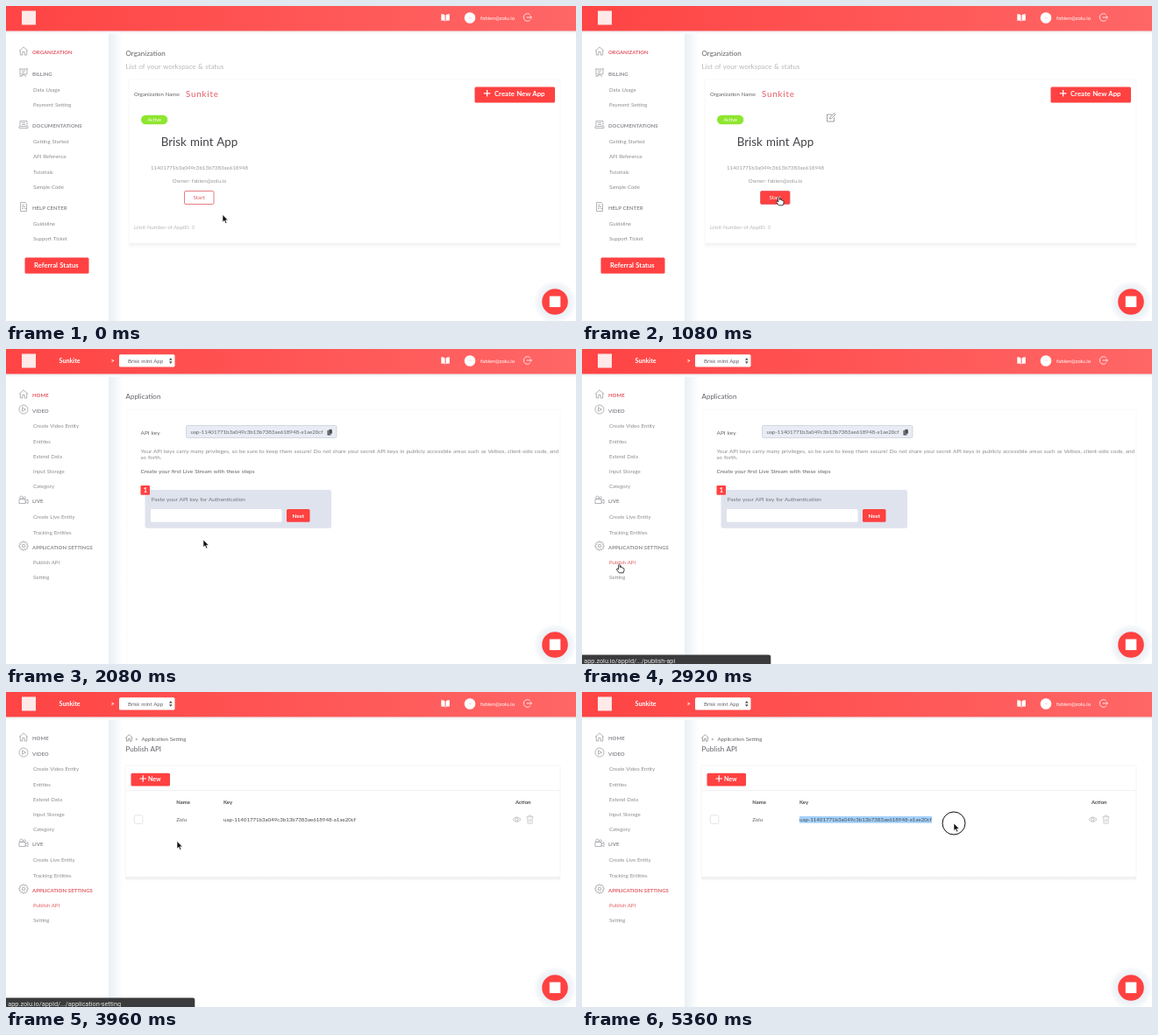
Recreate the animation shown at these times as an HTML page. Size 650 px wide and 360 px high, loop 5400 ms.

```html
<!DOCTYPE html>
<html lang="en">
<head>
<meta charset="utf-8">
<title>Console walkthrough</title>
<style>
html, body { margin: 0; width: 100%; height: 100%; overflow: hidden; background: #fff; }
svg { display: block; width: 650px; height: 360px; }
text { font-family: Lato, sans-serif; word-spacing: .06em; white-space: pre; }
.url { font-family: Roboto, sans-serif; word-spacing: 0; }
</style>
</head>
<body>
<svg id="stage" viewBox="0 0 650 360"></svg>
<script>
const RED = '#ff4141', ROSE = '#e25c64', GREY = '#8c8c92', DARK = '#626268', PALE = '#b8b8bc';
const ORG = 'Sunkite', APP = 'Brisk mint App', BRAND = 'Zolu', MAIL = 'fabien@zolu.io';
const ID = '11401771b3a049c3b13b7383ae618948', KEY = `uap-${ID}-a1ae20cf`;
const LOOP = 5400, OPEN_APP = 1120, OPEN_API = 3080;

const text = (x, y, s, size, fill = GREY, more = '') =>
  `<text x="${x}" y="${y}" font-size="${size}" fill="${fill}" ${more}>${s}</text>`;
const bold = (x, y, s, size, fill, more = '') => text(x, y, s, size, fill, 'font-weight="700" ' + more);
const mid = (x, y, s, size, fill) => text(x, y, s, size, fill, 'text-anchor="middle"');
const rect = (x, y, w, h, fill, r = 0, more = '') =>
  `<rect x="${x}" y="${y}" width="${w}" height="${h}" rx="${r}" fill="${fill}" ${more}/>`;
const line = (d, color, w = .7, more = '') =>
  `<path d="${d}" fill="none" stroke="${color}" stroke-width="${w}" stroke-linejoin="round" ${more}/>`;
const group = (id, ...parts) => `<g id="${id}">${parts.join('')}</g>`;
const plus = (x, y) => line(`M${x - 3.8} ${y}h7.6M${x} ${y - 3.8}v7.6`, '#fff', 1.2);

// Icons are drawn around their own centre
const ICONS = {
  home: 'M-5 0L0-4.7L5 0M-3.7-1V4.5H-1.2V1H1.2V4.5H3.7V-1',
  bill: 'M-5-4.5H5M-4-4.5V1.5H4V-4.5M-2-2.5H2M-2-.5H1M-3 4.5L0 1.5L3 4.5M-5 3.5H-2',
  docs: 'M-4-4H4V2H-4ZM-5 2V4H5V2M-2-2H2M-2 0H2',
  help: 'M-3.5-5H2L3.5-3V5H-3.5ZM-2-2H1M-2 0H2M-2 2H0M1 2H3',
  video: 'M5 0A5 5 0 1 1-5 0A5 5 0 1 1 5 0M-1.5-2.3L2.5 0L-1.5 2.3Z',
  live: 'M-5-1H2V4H-5ZM2 1L5-.5V4L2 2.5M-2.5-1A1.7 1.7 0 1 1-2.4-1M1-1A1.3 1.3 0 1 1 1.1-1',
  gear: 'M1.8 0A1.8 1.8 0 1 1-1.8 0A1.8 1.8 0 1 1 1.8 0M-1-5H1L1.4-3.6L3-4.3L4.3-3L3.6-1.4L5-1V1L3.6 1.4L4.3 3L3 4.3L1.4 3.6L1 5H-1L-1.4 3.6L-3 4.3L-4.3 3L-3.6 1.4L-5 1V-1L-3.6-1.4L-4.3-3L-3 -4.3L-1.4-3.6Z',
  eye: 'M-4.5 0Q0-5.4 4.5 0Q0 5.4-4.5 0M1.5 0A1.5 1.5 0 1 1-1.5 0A1.5 1.5 0 1 1 1.5 0',
  bin: 'M-4-3H4M-1.5-3V-4.5H1.5V-3M-3-3L-2.6 4.5H2.6L3-3M-1-1V3M1-1V3',
  edit: 'M1-3.5H-4.5V4.5H3.5V0M-1.5 1.5L-1-.5L3.5-5L5-3.5L.5 1Z',
  exit: 'M3.2-3A4.3 4.3 0 1 0 3.2 3M-1 0H5M3.2-1.8L5 0L3.2 1.8'
};
const icon = (name, x, y, color = '#94949b', w = .7, k = 1) =>
  line(ICONS[name], color, w, `transform="translate(${x} ${y}) scale(${k})"`);

// Menu sections: icon, title, y, then item and y pairs
const menu = (sections, active) => sections.map(([ic, title, y, ...items]) => {
  let out = icon(ic, 20, y - 1.5) +
    bold(30, y + 2.2, title, 6, title === active ? ROSE : GREY, `data-item="${title}"`);
  for (let i = 0; i < items.length; i += 2)
    out += text(31, items[i + 1] + 2, items[i], 6, GREY, `data-item="${items[i]}"`);
  return out;
}).join('');

const orgMenu = [
  ['home', 'ORGANIZATION', 53],
  ['bill', 'BILLING', 78, 'Data Usage', 96, 'Payment Setting', 113],
  ['docs', 'DOCUMENTATIONS', 137, 'Getting Started', 155, 'API Reference', 172, 'Tutorials', 190, 'Sample Code', 207],
  ['help', 'HELP CENTER', 231, 'Guideline', 248.5, 'Support Ticket', 266]
];
const appMenu = [
  ['home', 'HOME', 53],
  ['video', 'VIDEO', 70.5, 'Create Video Entity', 88, 'Entities', 105.5, 'Extend Data', 122.5, 'Input Storage', 140, 'Category', 157],
  ['live', 'LIVE', 174, 'Create Live Entity', 192, 'Tracking Entities', 209.5],
  ['gear', 'APPLICATION SETTINGS', 226.5, 'Publish API', 244, 'Setting', 261]
];

const stage = document.getElementById('stage');
stage.innerHTML = `
<defs>
  <linearGradient id="bar"><stop stop-color="#ff4444"/><stop offset="1" stop-color="#ff6666"/></linearGradient>
  <linearGradient id="side"><stop stop-color="#e9eff4"/><stop offset="1" stop-color="#fff"/></linearGradient>
  <linearGradient id="drop" x2="0" y2="1"><stop stop-color="#e9e9ec"/><stop offset="1" stop-color="#fff"/></linearGradient>
  <radialGradient id="halo"><stop offset=".55" stop-color="#e6ecf2"/><stop offset="1" stop-color="#fbfcfd"/></radialGradient>
</defs>` +
rect(0, 0, 650, 360, '#fff') +
rect(117, 28, 16, 332, 'url(#side)') +
rect(0, 28, 650, 4, 'url(#drop)') +
rect(0, 0, 650, 28.5, 'url(#bar)') +
rect(18, 5.5, 16, 16, '#ffe9e9') +
'<path d="M500.6 10.5Q499 9 496.3 9.3V16.7Q499 16.2 500.6 17.5ZM501.6 10.5Q503 9 505.8 9.3V16.7Q503 16.2 501.6 17.5Z" fill="#fff"/>' +
`<circle cx="529" cy="13.5" r="6.3" fill="#fff"/>` + line('M526.5 13.5H531.5', '#f6dede', .8) +
text(541, 15.6, MAIL, 6.1, '#fff') +
icon('exit', 594.5, 13, '#fff', .8) +

group('orgPage',
  menu(orgMenu, 'ORGANIZATION'),
  rect(21.5, 287.5, 73, 18.3, RED, 1.5), bold(32, 299.4, 'Referral Status', 7.7, '#fff'),
  text(136.5, 56.8, 'Organization', 8, DARK),
  text(136.5, 71.6, 'List of your workspace &amp; status', 8, PALE),
  rect(140, 84, 492, 188, '#fff', 2, 'stroke="#f6f7f9" stroke-width=".8"'),
  rect(140, 271, 492, 6, 'url(#drop)', 0, 'opacity=".6"'),
  text(146, 103, 'Organization Name:', 6, DARK),
  text(205, 103.6, ORG, 9.8, ROSE, 'letter-spacing=".8"'),
  rect(534.5, 92.4, 91.5, 18.2, RED, 1.5), plus(548.6, 99.8), bold(557, 103.4, 'Create New App', 7.75, '#fff'),
  rect(154, 124.8, 30.3, 10.4, '#8ee62e', 5.2), mid(169.2, 132, 'Active', 5.6, '#fff'),
  group('edit', icon('edit', 284, 127.5, '#8a8a90', .8)),
  mid(220.5, 159.5, APP, 13.4, '#44444a'),
  mid(220.5, 187.2, ID, 6.12, '#98989c'),
  mid(220.5, 202.2, 'Owner: ' + MAIL, 6.15, '#98989c'),
  rect(203.5, 211.5, 33.5, 15, '#fff', 1.5, `id="start" stroke="${ROSE}" stroke-width=".8"`),
  group('startText', mid(220.2, 221.2, 'Start', 6.3)),
  text(146, 255, 'Limit Number of AppID: 3', 6, PALE)
) +

group('appPages',
  menu(appMenu),
  bold(60.5, 16.2, ORG, 7.2, '#fff'), bold(119.5, 16.2, '&gt;', 7.5, '#fff'),
  rect(129, 6.3, 63.5, 14.3, '#fff', 1.5), text(139, 15.7, APP, 6.15, DARK),
  '<path d="M186 12.7L187.8 10L189.6 12.7ZM186 14.3L187.8 17L189.6 14.3Z" fill="#555"/>'
) +

group('keyPage',
  text(136.5, 56.8, 'Application', 8, DARK),
  rect(138, 69, 494, 300, 'none', 2, 'stroke="#f8f8fa" stroke-width=".8"'),
  text(153.5, 97.8, 'API key', 6.5, DARK),
  rect(205.5, 87.5, 171.5, 14, '#e9ecf4', 1.5, 'stroke="#ccd0dc" stroke-width=".8"'),
  text(210.5, 97, KEY, 6.13, DARK),
  rect(366.5, 93, 4, 5.5, '#444', .6), rect(368, 91.8, 4, 5.2, '#444', .6, 'stroke="#e9ecf4" stroke-width=".5"'),
  text(153.5, 118.8, 'Your API keys carry many privileges, so be sure to keep them secure! Do not share your secret API keys in publicly accessible areas such as Velbox, client-side code, and', 6.4),
  text(153.5, 125.8, 'so forth.', 6.4),
  text(153.5, 142, 'Create your first Live Stream with these steps', 6.42, DARK),
  rect(158.5, 161, 212.5, 43.8, '#dfe3ed', 2),
  rect(153.5, 156, 10.5, 10.7, RED, 1), bold(156.7, 164, '1', 7.2, '#fff'),
  text(165.8, 173.8, 'Paste your API key for Authentication', 6.43, '#74747c'),
  rect(165, 183, 149.5, 14.8, '#fff', 1),
  rect(320, 183, 26.5, 14.8, RED, 1.5), bold(326.5, 192.6, 'Next', 6.3, '#fff')
) +

group('apiPage',
  icon('home', 140.3, 52.5, '#77777c', .8, .8),
  text(147, 56, '&gt;', 6.1, DARK), text(154.5, 56, 'Application Setting', 6.1, DARK),
  text(136.5, 68.2, 'Publish API', 8.1, DARK),
  rect(136, 211, 496, 5, 'url(#drop)'),
  rect(136, 84, 496, 127.5, '#fff', 1.5, 'stroke="#f0f1f3" stroke-width=".8"'),
  line('M136 112.5H632', '#eeeff1', .8),
  rect(142.5, 92.7, 44.5, 14.8, RED, 1.5), plus(156.2, 99), bold(162, 102.2, 'New', 7, '#fff'),
  bold(194.3, 128.4, 'Name', 5.9, '#4a4a50'), bold(248, 128.4, 'Key', 5.9, '#4a4a50'), bold(581, 128.4, 'Action', 5.9, '#4a4a50'),
  rect(146.3, 140.8, 9.6, 9.8, '#fff', 2, 'stroke="#dddde0" stroke-width=".8"'),
  rect(248, 142, 0, 7.8, '#a5d2fb', 0, 'id="mark"'),
  text(194.3, 148, BRAND, 6.1, DARK), text(248, 148, KEY, 6.13, '#4a4a50'),
  icon('eye', 582.5, 145.7, '#b9b9be', .9), icon('bin', 597.5, 145.7, '#c4c4c8', .8)
) +

'<circle cx="626" cy="338.5" r="24" fill="url(#halo)"/>' +
`<circle cx="626" cy="338" r="14.8" fill="${RED}"/>` + rect(619.8, 331.6, 12.5, 12.5, '#fff') +
group('status',
  '<path d="M0 349.6H213Q215.3 349.6 215.3 352V360H0Z" fill="#3b3b3d"/>',
  text(2.3, 358.6, '', 7.3, '#e4e4e4', 'class="url" id="url"')) +
group('pointer',
  group('ring', '<circle r="13" fill="none" stroke="#111" stroke-width="1"/>'),
  group('arrow', '<path d="M0 0V8.6L2 6.8L3.4 9.9L4.8 9.3L3.5 6.3H6.2Z" fill="#111" stroke="#fff" stroke-width=".6"/>'),
  group('hand', '<path d="M-.9.8Q0-.6.9.8V3.6Q2-.0 2.6 4Q3.7 3 4.1 4.4Q5.4 3.8 5.5 5.4V7.2L4.6 9.8H-.2L-2.9 6.3Q-3.2 4.8-1.8 5.2L-.9 6Z" fill="#fff" stroke="#111" stroke-width=".8" stroke-linejoin="round"/>'));

const $ = id => document.getElementById(id);
const show = (id, on) => $(id).style.display = on ? '' : 'none';
const paint = (item, color) =>
  document.querySelector(`#appPages [data-item="${item}"]`).setAttribute('fill', color);

// Pointer stops: time, x, y
const path = [
  [0, 247, 238.5], [240, 247, 238.5], [860, 224.5, 218], [2280, 225, 218],
  [2760, 42.5, 246], [3260, 42.5, 246], [3900, 195, 170.5], [4060, 195, 170.5],
  [4520, 257.5, 136.5], [4680, 249, 146], [5240, 424, 150], [LOOP, 424, 150]
];
function pointerAt(t) {
  const i = path.findIndex(p => p[0] > t);
  const [t0, x0, y0] = path[i - 1], [t1, x1, y1] = path[i];
  const u = (t - t0) / (t1 - t0), e = u * u * (3 - 2 * u);
  return [x0 + (x1 - x0) * e, y0 + (y1 - y0) * e];
}

function draw(now) {
  const t = now % LOOP, [x, y] = pointerAt(t);
  const inApp = t >= OPEN_APP, inApi = t >= OPEN_API, drag = t >= 4680;
  const onStart = !inApp && x > 203 && x < 237 && y > 211 && y < 227;
  const onLink = t >= 2640 && t < 3520;

  show('orgPage', !inApp);
  show('appPages', inApp);
  show('keyPage', inApp && !inApi);
  show('apiPage', inApi);
  show('edit', t >= 280);
  $('start').setAttribute('fill', onStart ? RED : '#fff');
  $('startText').firstChild.setAttribute('fill', onStart ? '#fff' : ROSE);

  paint('HOME', inApi ? GREY : ROSE);
  paint('APPLICATION SETTINGS', inApi ? ROSE : GREY);
  paint('Publish API', inApi || onLink ? ROSE : GREY);

  show('status', t >= 2640 && t < 4240);
  $('url').textContent = 'app.zolu.io/appId/.../' + (t < 3400 ? 'publish-api' : 'application-setting');

  $('mark').setAttribute('width', drag ? Math.max(0, Math.min(x, 399) - 248) : 0);
  $('pointer').setAttribute('transform', `translate(${x} ${y})`);
  show('ring', drag);
  show('hand', onStart || onLink);
  show('arrow', !onStart && !onLink);
  requestAnimationFrame(draw);
}
draw(performance.now());
</script>
</body>
</html>
```
